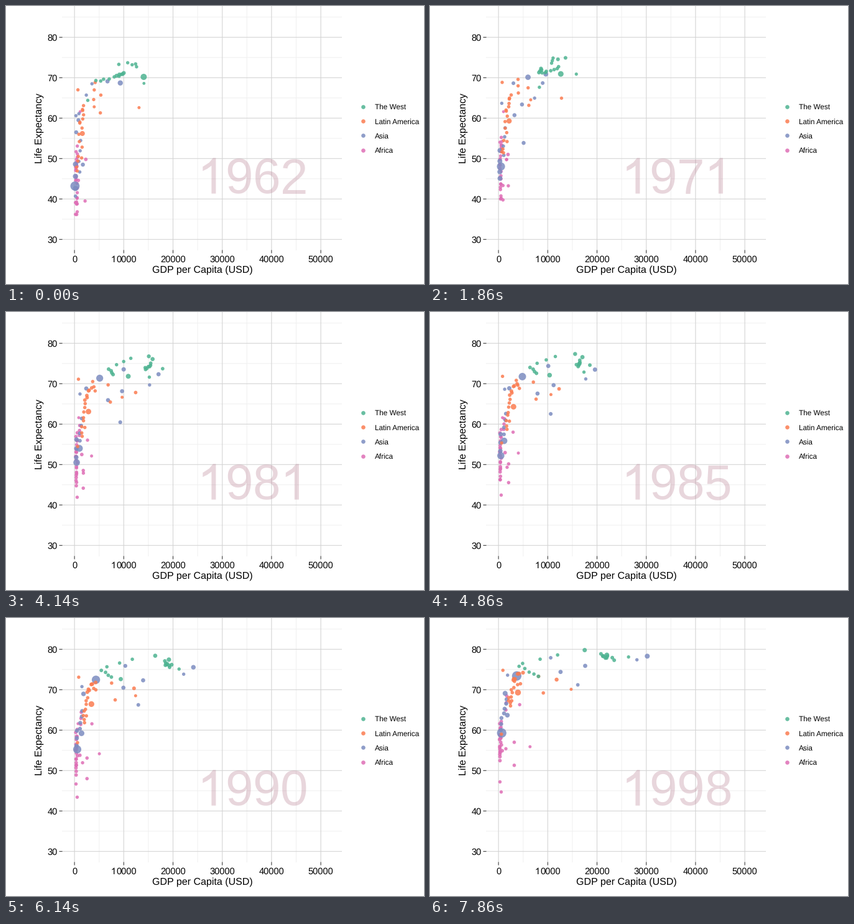
These frames come from a looping animation (672x447 px, 8 s). A matplotlib script:

```python
import numpy as np
import matplotlib.pyplot as plt
from matplotlib.animation import FuncAnimation
from matplotlib.patches import Polygon

W, H, DPI = 672, 447, 96
STEPS = 55            # moves from the first state to the last
FRAMES, TICK = 200, 40
PX = 72 / DPI         # points per pixel
LEFT, RIGHT, BOTTOM = 90, 540, 393

plt.rcParams["font.family"] = "Liberation Sans"
plt.rcParams["text.hinting"] = "none"
fig = plt.figure(figsize=(W / DPI, H / DPI), dpi=DPI, facecolor="white")
ax = fig.add_axes([0, 0, 1, 1])
ax.set(xlim=(0, W), ylim=(H, 0))
ax.axis("off")
rng = np.random.default_rng(4)


def px(gdp):
    """Pixel x for GDP in thousands of dollars."""
    return 110.1 + 7.92 * gdp


def py(life):
    return 50.3 + 6.5 * (80 - life)


# Each dot is a row: gdp, life, radius at the start, then the same at the end.
def dot(start, end, r0=2.7, r1=2.7):
    return np.array([[*start, r0, *end, r1]])


def swarm(n, start, end, r0=2.7, r1=2.8, wobble=(0, 0)):
    """Dots spread from one line segment to another, with random offsets."""
    t = np.linspace(0, 1, n)[:, None]
    (a, b), (c, d) = np.array(start), np.array(end)
    first = a + (b - a) * t + rng.uniform(-1, 1, (n, 2)) * wobble
    last = c + (d - c) * t + rng.uniform(-1, 1, (n, 2)) * wobble
    radii = np.tile([r0, r1], (n, 1))
    return np.c_[first, radii[:, 0], last, radii[:, 1]]


WEST = [
    dot((12.4, 73.4), (17.5, 79.8), 2.8, 3.5),
    dot((9.0, 73.3), (22.0, 78.6), 2.8, 3.8),
    dot((14.05, 70.2), (8.1, 73.3), 5.0, 3.0),
    dot((2.7, 64.4), (26.4, 78.1)),
    dot((14.1, 68.6), (21.3, 78.3), 2.4, 3.3),
    swarm(7, [(3.9, 69.3), (9.6, 70.6)], [(23.0, 77.4), (20.8, 78.5)],
          2.8, 3.0, (0.5, 0.4)),
    swarm(4, [(8.6, 70.6), (10.1, 71.0)], [(7.2, 73.8), (4.3, 75.8)],
          3.2, 2.8, (0.2, 0.2)),
    swarm(3, [(12.6, 72.7), (10.8, 73.7)], [(4.9, 76.5), (12.0, 78.6)]),
]
LATIN = [
    dot((0.7, 67.0), (0.9, 74.8)),
    dot((13.1, 62.6), (11.8, 72.5), 2.5, 3.2),
    dot((4.0, 62.8), (14.75, 70.1), 2.5, 2.5),
    dot((1.6, 56.2), (3.95, 69.3), 4.0, 4.8),
    dot((0.7, 49.4), (0.6, 59.0)),
    swarm(2, [(5.25, 61.3), (5.35, 65.7)], [(9.1, 69.2), (8.15, 73.3)]),
    swarm(9, [(0.8, 46.5), (1.6, 58.8)], [(2.6, 66.0), (2.6, 70.4)],
          wobble=(0.6, 0.7)),
    swarm(6, [(1.4, 59.2), (2.0, 63.2)], [(2.7, 72.0), (4.7, 74.4)],
          2.7, 3.1, (0.4, 0.6)),
    swarm(3, [(3.8, 64.5), (4.2, 69.2)], [(4.3, 71.0), (3.2, 71.8)],
          wobble=(0.2, 0.5)),
]
ASIA = [
    dot((6.7, 69.1), (3.7, 73.4), 3.4, 7.6),
    dot((9.3, 68.7), (10.6, 77.9), 4.2, 2.9),
    dot((2.4, 65.7), (30.2, 78.3), 2.7, 4.0),
    dot((0.9, 61.1), (28.1, 77.4)),
    dot((3.55, 68.5), (1.35, 69.1), 2.7, 4.0),
    dot((1.7, 48.5), (16.1, 71.2), 3.3, 2.9),
    dot((0.1, 43.2), (1.8, 63.7), 7.4, 3.8),
    dot((0.2, 40.7), (0.65, 59.3), 2.8, 7.6),
    dot((0.3, 60.6), (1.85, 73.6)),
    swarm(2, [(0.35, 56.5), (0.8, 59.5)], [(12.6, 74.4), (17.6, 75.9)],
          3.2, 3.4),
    swarm(3, [(0.2, 42.6), (0.2, 48.6)], [(0.5, 60.0), (0.6, 63.0)], 4.2, 3.2),
    swarm(4, [(0.9, 46.6), (1.1, 54.5)], [(1.2, 64.2), (1.6, 67.5)],
          2.7, 3.3, (0.2, 0.2)),
]
AFRICA = [
    dot((1.15, 61.6), (0.6, 61.6), 2.4, 2.4),
    dot((0.2, 47.9), (6.4, 55.9), 2.5, 2.5),
    dot((0.8, 44.6), (4.3, 66.3)),
    dot((2.3, 49.8), (0.75, 54.9), 2.9, 2.9),
    dot((2.15, 39.5), (1.5, 55.4)),
    dot((0.55, 38.8), (0.55, 44.7)),
    dot((0.35, 44.8), (0.3, 47.2)),
    swarm(2, [(0.2, 36.2), (0.2, 39.1)], [(3.2, 51.3), (3.2, 57.0)]),
    swarm(3, [(0.4, 48.5), (0.4, 49.8)], [(1.5, 65.0), (1.65, 68.5)]),
    swarm(20, [(0.4, 36.5), (0.4, 52.5)], [(0.4, 52.8), (0.4, 61.5)],
          2.7, 2.9, (0.2, 0.7)),
]
GROUPS = [
    ("The West", "#4DB391", WEST),
    ("Latin America", "#FB7B50", LATIN),
    ("Asia", "#7C8CC0", ASIA),
    ("Africa", "#DE6DB5", AFRICA),
]


def text(x, y, s, size, **kw):
    return ax.text(x, y, s, fontsize=size * PX, va="baseline", **kw)


ONE = np.array([(763, 0), (583, 0), (583, 1147), (412, 1023), (223, 930),
                (223, 1104), (485, 1274), (647, 1466), (763, 1466)]) / 2048


def footless_one(x, y, size, **kw):
    """The digit 1 without a foot, its origin at x, y."""
    return ax.add_patch(Polygon(ONE * (size, -size) + (x, y), lw=0, **kw))


def grid(xs, ys, color):
    style = dict(color=color, lw=1.07 * PX, zorder=1, snap=False)
    ax.vlines(px(xs), 0, BOTTOM, **style)
    ax.hlines(py(ys), LEFT, RIGHT, **style)


grid(np.arange(5, 50, 10), np.arange(35, 90, 10), "#F1F1F1")
grid(np.arange(0, 60, 10), np.arange(30, 90, 10), "#D3D3D3")

TICK_SIZE = 14.67
MARK = dict(color="#333333", lw=1.07 * PX, snap=False)
for life in range(30, 90, 10):
    y = py(life)
    ax.plot([LEFT - 4, LEFT], [y, y], **MARK)
    text(82.5, y + 5.2, str(life), TICK_SIZE, ha="right")
for gdp in range(0, 60, 10):
    x = px(gdp)
    ax.plot([x, x], [BOTTOM, BOTTOM + 4], **MARK)
    if gdp == 10:
        pitch = 0.556 * TICK_SIZE
        footless_one(x - 2.5 * pitch, 412, TICK_SIZE, color="black")
        text(x - 1.5 * pitch, 412, "0000", TICK_SIZE)
    else:
        text(x, 412, str(gdp * 1000), TICK_SIZE, ha="center")
text(315.5, 429, "GDP per Capita (USD)", 16, ha="center")
ax.text(57.5, 196.5, "Life Expectancy", fontsize=16 * PX, rotation=90,
        rotation_mode="anchor", ha="center", va="baseline")


def area(r):
    """Scatter size for a radius in pixels."""
    return (2 * r * PX) ** 2


clouds = []
for i, (name, color, parts) in enumerate(GROUPS):
    rows = np.vstack(parts)
    start, end = (np.c_[px(s[:, 0]), py(s[:, 1]), s[:, 2]]
                  for s in (rows[:, :3], rows[:, 3:]))
    style = dict(color=color, alpha=0.85, linewidths=0, zorder=9 - i)
    dots = ax.scatter(start[:, 0], start[:, 1], s=area(start[:, 2]), **style)
    clouds.append((dots, start, end))
    y = 162 + 23.2 * i
    ax.scatter([574], [y], s=area(3.3), **style)
    text(593, y + 4.2, name, 11.73)

YEAR_X, YEAR_Y, YEAR_SIZE = 307.6, 301.6, 80
GHOST = dict(color="#B5788C", alpha=0.3, zorder=3)
slots = [YEAR_X + 0.556 * YEAR_SIZE * i for i in range(4)]
digits = [text(x, YEAR_Y, "", YEAR_SIZE, **GHOST) for x in slots]
ones = [footless_one(x, YEAR_Y, YEAR_SIZE, **GHOST) for x in slots]


def show_year(year):
    for ch, digit, one in zip(str(year), digits, ones):
        digit.set_text("" if ch == "1" else ch)
        one.set_visible(ch == "1")


def draw(frame):
    step = min(STEPS, int(frame * TICK * 0.007 + 0.28))
    for dots, start, end in clouds:
        now = start + (end - start) * step / STEPS
        dots.set_offsets(now[:, :2])
        dots.set_sizes(area(now[:, 2]))
    show_year(int(1962.5 + 0.662 * step))
    return []


anim = FuncAnimation(fig, draw, frames=FRAMES, interval=TICK, repeat=True,
                     repeat_delay=0, init_func=lambda: draw(0))
plt.show()
```
